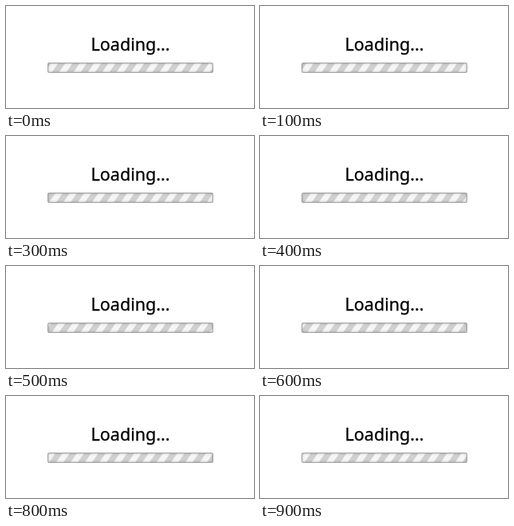
These frames come from a looping animation (311 by 128 pixels, 1000 ms). An HTML page:

```html
<!DOCTYPE html>
<html lang="en">
<head>
<meta charset="utf-8">
<title>Loading</title>
<style>
html, body { margin: 0; width: 100%; height: 100%; overflow: hidden; background: #fff; }
svg { display: block; width: 311px; height: 128px; }
text { font: 21.5px "Noto Sans", "Open Sans", sans-serif; fill: #000; stroke: #000; stroke-width: .3px; }
</style>
</head>
<body>
<svg viewBox="0 0 311 128">
  <defs>
    <clipPath id="bar"><rect x="52" y="71" width="208" height="13" rx="2.5"/></clipPath>
    <filter id="soft"><feGaussianBlur stdDeviation="1.5"/></filter>
  </defs>
  <text x="106.6" y="56">Loading...</text>
  <g clip-path="url(#bar)">
    <rect x="52" y="71" width="208" height="13" fill="#d0d0d0"/>
    <path id="stripes" fill="#f6f6f6"/>
    <rect x="52" y="71" width="208" height="13" rx="2" fill="none" stroke="#000" stroke-opacity=".3" stroke-width="2" filter="url(#soft)"/>
  </g>
  <rect x="52.5" y="71.5" width="207" height="12" rx="2" fill="none" stroke="#a3a3a3"/>
</svg>
<script>
const period = 18, steps = 10, loop = 1000;
const stripes = document.getElementById('stripes');
let d = '';
for (let x = 12; x < 290; x += period) d += `M${x} 84l9 -13h9l-9 13z`;
stripes.setAttribute('d', d);

const frames = Array.from({ length: steps + 1 }, (_, i) => ({
  transform: `translateX(${i * period / steps}px)`,
  offset: i / steps,
  easing: 'steps(1, end)'
}));
stripes.animate(frames, { duration: loop, iterations: Infinity });
</script>
</body>
</html>
```
